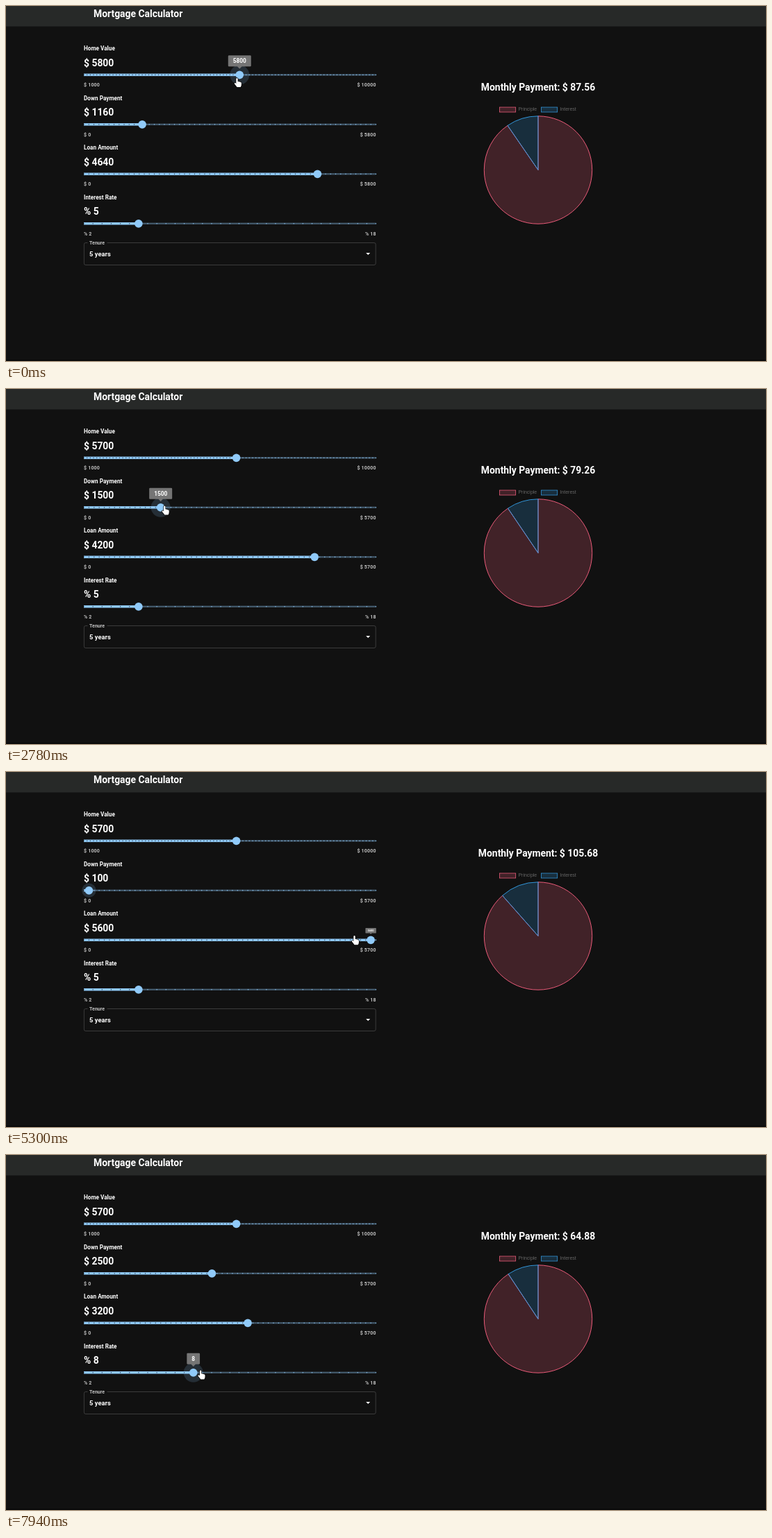
Write an HTML page with a canvas that moves like this. It is 1094 by 512 pixels and loops after 8000 ms.

```html
<!DOCTYPE html>
<html lang="en">
<head>
<meta charset="utf-8">
<title>Mortgage Calculator</title>
<style>
html, body { margin: 0; width: 100%; height: 100%; overflow: hidden; background: #111; }
canvas { display: block; }
</style>
</head>
<body>
<canvas id="stage" width="1094" height="512"></canvas>
<script>
const ctx = document.getElementById('stage').getContext('2d');
const LOOP = 8000, REFRESH = 135, PHASE = 35, LAG = 150, LEAD = 15, TERM = 60;
const LEFT = 112, WIDTH = 420.5, BLUE = '#90caf9', FULL = Math.PI * 2;

// grip: where the pointer holds the thumb, relative to its centre.
const sliders = [
  { label: 'Home Value', unit: '$', key: 'home', press: -500, release: 1500, grip: [-4, 5] },
  { label: 'Down Payment', unit: '$', key: 'down', press: 2440, release: 4600, grip: [0, -2] },
  { label: 'Loan Amount', unit: '$', key: 'loan', press: 5680, release: 6750, grip: [0, -2] },
  { label: 'Interest Rate', unit: '%', key: 'rate', press: 7480, release: LOOP + 1000, grip: [0, -3] }
];
sliders.forEach((s, i) => {
  s.y = 99.3 + 71.5 * i;
  s.hover = s.press - 300;
  s.leave = s.release + 250;
  s.blur = i < 3 ? sliders[i + 1].press : LOOP;
});

const clamp = v => Math.max(0, Math.min(1, v));
const ramp = (t, start, end) => clamp((t - start) / (end - start));
const snap = (v, step) => Math.round(v / step) * step;

function loanState(t, stepped) {
  const round = (v, step) => stepped ? snap(v, step) : v;
  const home = t < 100 ? 5800 : round(5300 + 400 * Math.cos(FULL * ramp(t, 150, 1420)), 100);
  const dragged = 1140 + 1460 * ramp(t, 2560, 3200) - 2500 * ramp(t, 3840, 4185) + 2400 * ramp(t, 5773, 6500);
  const down = t < 2560 ? home * 0.2 : round(dragged, 100);
  const rate = round(5 + 4 * ramp(t, 7525, 7944), 0.5);
  const loan = home - down, r = rate / 1200;
  const payment = loan * r / (1 - (1 + r) ** -TERM);
  return { home, down, loan, rate, payment, interest: payment * TERM - loan };
}

function bounds(key, home) {
  if (key === 'home') return [1000, 10000, 90];
  if (key === 'rate') return [2, 18, 32];
  return [0, home, home / 100];
}

function thumbX(key, state) {
  const [min, max] = bounds(key, state.home);
  return LEFT + WIDTH * (state[key] - min) / (max - min);
}

function text(str, x, y, size, { color = '#fff', weight = 700, align = 'left', gap = 0, family = 'Roboto' } = {}) {
  ctx.font = `${weight} ${size}px ${family}, sans-serif`;
  ctx.letterSpacing = gap + 'px';
  ctx.textAlign = align;
  ctx.fillStyle = color;
  ctx.fillText(str, x, y);
}

function rect(x, y, w, h, color) {
  ctx.fillStyle = color;
  ctx.fillRect(x, y, w, h);
}

function disc(x, y, r, color) {
  ctx.fillStyle = color;
  ctx.beginPath();
  ctx.arc(x, y, r, 0, FULL);
  ctx.fill();
}

function slider({ label, unit, key, y, hover, press, release, blur }, x, now, t) {
  const [min, max, steps] = bounds(key, now.home);
  text(label, LEFT, y - 35.3, 8.17, { gap: 0.03 });
  text(`${unit} ${now[key]}`, LEFT, y - 12.6, 13.9);
  const small = { color: '#c0c0c0', gap: 0.2 };
  text(`${unit} ${min}`, LEFT, y + 17, 7, small);
  text(`${unit} ${max}`, LEFT + WIDTH + 0.2, y + 17, 7, { ...small, align: 'right' });
  rect(LEFT, y - 1.17, WIDTH, 2.33, 'rgba(144,202,249,.38)');
  rect(LEFT, y - 1.75, x - LEFT, 3.5, BLUE);
  for (let i = 0; i <= steps; i++) {
    const mark = LEFT + WIDTH * i / steps;
    rect(mark - 0.58, y - 0.58, 1.17, 1.17, mark <= x ? 'rgba(18,18,18,.8)' : BLUE);
  }
  const halo = t >= press && t < release ? 14 : t >= hover && t < blur ? 10.2 : 0;
  if (halo) disc(x, y, halo, 'rgba(144,202,249,.16)');
  disc(x, y, 5.85, BLUE);
}

function tooltip({ y, hover, leave }, x, value, t) {
  const k = Math.min(ramp(t, hover - 150, hover), 1 - ramp(t, leave, leave + 150));
  if (!k) return;
  ctx.save();
  ctx.translate(x, y - 8);
  ctx.scale(k, k);
  const w = 14 + 4.75 * String(value).length;
  ctx.fillStyle = '#757575';
  ctx.beginPath();
  ctx.roundRect(-w / 2, -20, w, 16, 1.2);
  ctx.moveTo(-3.5, -4.2);
  ctx.lineTo(3.5, -4.2);
  ctx.lineTo(0, -0.7);
  ctx.fill();
  text(value, 0, -9, 8.3, { align: 'center' });
  ctx.restore();
}

function swatch(x, label, rgb) {
  rect(x, 146, 23.3, 7, `rgba(${rgb},.2)`);
  ctx.strokeStyle = `rgb(${rgb})`;
  ctx.lineWidth = 0.7;
  ctx.strokeRect(x, 146, 23.3, 7);
  text(label, x + 27, 151.4, 7, { color: '#666', weight: 400, family: '"Liberation Sans"' });
}

function slice(from, to, rgb) {
  ctx.beginPath();
  ctx.moveTo(766, 236.5);
  ctx.arc(766, 236.5, 77.7, from - FULL / 4, to - FULL / 4);
  ctx.closePath();
  ctx.fillStyle = `rgba(${rgb},.2)`;
  ctx.fill();
  ctx.strokeStyle = `rgb(${rgb})`;
  ctx.lineWidth = 0.9;
  ctx.stroke();
}

function tenure() {
  ctx.strokeStyle = '#484848';
  ctx.lineWidth = 0.8;
  ctx.beginPath();
  ctx.roundRect(112.4, 341.5, 419.8, 32, 2.3);
  ctx.stroke();
  rect(117.5, 340, 28, 3, '#111');
  text('Tenure', 120, 344, 7, { color: '#c0c0c0', gap: 0.04 });
  text('5 years', 120, 361, 9.33, { gap: 0.05 });
  ctx.fillStyle = '#fff';
  ctx.fill(new Path2D('M518.2 356h6l-3 3z'));
}

const handShape = new Path2D('M-1 1Q-1-.4 .2-.4T1.4 1V4.6Q2.6 4 3.2 5Q4.4 4.5 5 5.5Q6.6 5.2 6.6 7V9.2Q6.6 11 5.4 12.8H.2Q-.8 11-3.3 8.2Q-4 7-2.9 6.6Q-2 6.4-1 7.7Z');

// The pointer runs slightly ahead of the thumb it drags, then glides to the next one.
function handPosition(t) {
  const state = loanState(t + LEAD, false);
  const sag = 7 * ramp(t, 3840, 4185);
  const spots = sliders.map(({ key, y, grip }) =>
    [thumbX(key, state) + grip[0], y + grip[1] + (key === 'down' ? sag : 0)]);
  let [x, y] = spots[0];
  for (let i = 1; i < spots.length; i++) {
    const glide = 1 - (1 - ramp(t, sliders[i - 1].leave, sliders[i].hover)) ** 1.5;
    x += (spots[i][0] - x) * glide;
    y += (spots[i][1] - y) * glide;
  }
  return [x, y];
}

function hand(x, y) {
  ctx.save();
  ctx.translate(x, y);
  ctx.strokeStyle = '#000';
  ctx.lineWidth = 1.3;
  ctx.stroke(handShape);
  ctx.fillStyle = '#fff';
  ctx.fill(handShape);
  ctx.restore();
}

function draw(t) {
  const now = loanState(t, true), late = loanState(t - LAG, false);
  rect(0, 0, 1094, 512, '#111');
  rect(0, 510, 1094, 2, '#0a0a0a');
  rect(0, 0, 1094, 29.5, '#272928');
  text('Mortgage Calculator', 126, 16.2, 13.9);

  // A dragged thumb jumps at once; the others and the chart ease behind.
  const thumbs = sliders.map(s => thumbX(s.key, t >= s.press && t < s.release ? now : late));
  sliders.forEach((s, i) => slider(s, thumbs[i], now, t));
  tenure();

  text(`Monthly Payment: $ ${now.payment.toFixed(2)}`, 766, 121.8, 13.9, { align: 'center' });
  const red = '255,99,132', blue = '54,162,235';
  swatch(710.4, 'Principle', red);
  swatch(770.4, 'Interest', blue);
  const split = FULL * late.home / (late.home + late.interest);
  slice(0, split, red);
  slice(split, FULL, blue);

  sliders.forEach((s, i) => tooltip(s, thumbs[i], now[s.key], t));
  hand(...handPosition(t));
}

function tick() {
  const t = performance.now() % LOOP;
  draw(Math.max(0, PHASE + REFRESH * Math.floor((t - PHASE + 8) / REFRESH)));
  requestAnimationFrame(tick);
}
tick();
</script>
</body>
</html>
```
